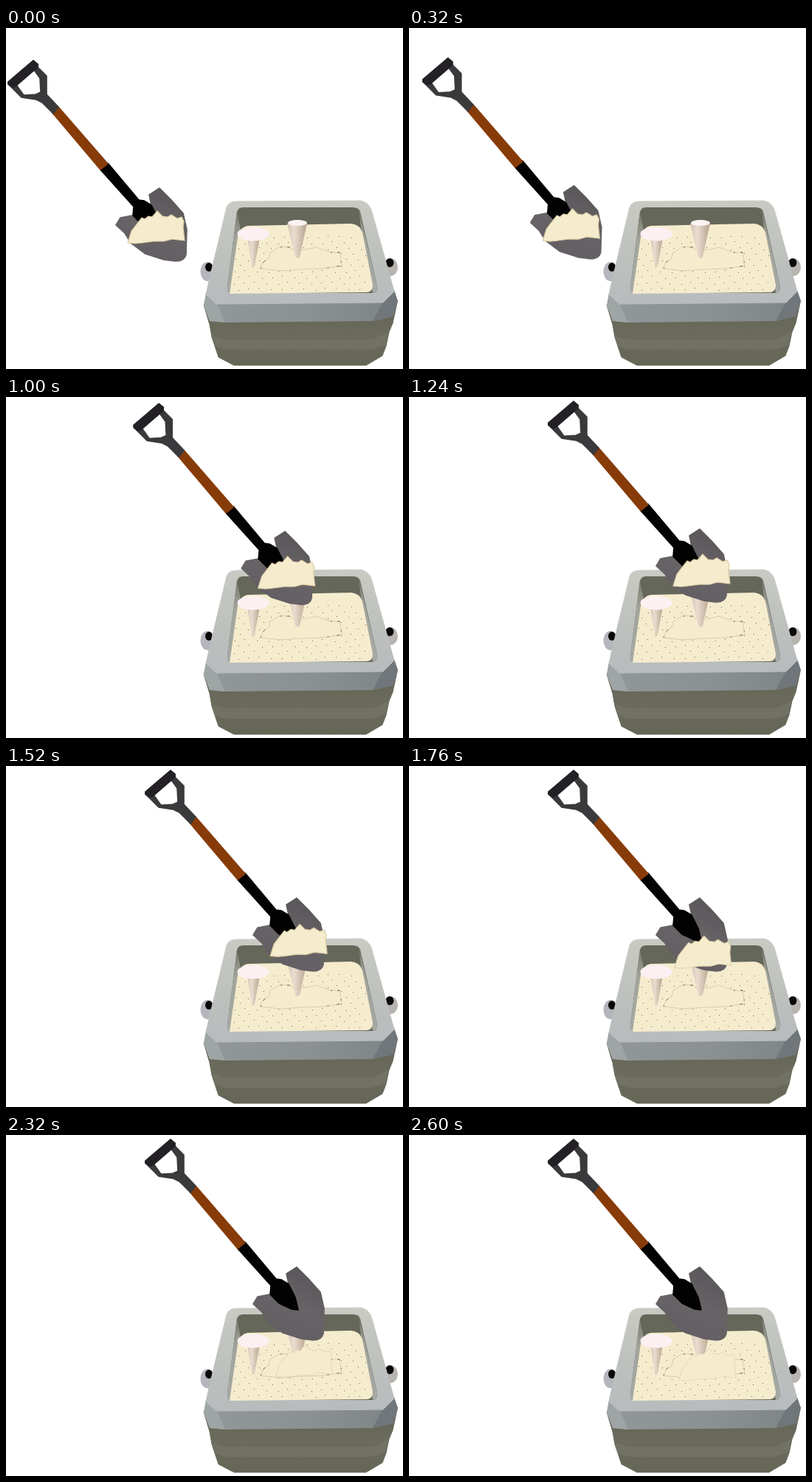
Recreate the animation shown at these times as an HTML page. Size 538 by 462 pixels, loop 2640 ms.

```html
<!DOCTYPE html>
<html lang="en">
<head>
<meta charset="utf-8">
<title>Filling the mould</title>
<style>
html, body { margin: 0; width: 100%; height: 100%; overflow: hidden; background: #fff; }
svg { display: block; width: 538px; height: 462px; }
</style>
</head>
<body>
<svg viewBox="0 0 538 462">
  <defs>
    <linearGradient id="cone">
      <stop offset="0" stop-color="#d3c4b6"/><stop offset=".35" stop-color="#eadccf"/><stop offset="1" stop-color="#b5a28d"/>
    </linearGradient>
    <linearGradient id="steel" x1="1" y1="0" x2=".5" y2="1">
      <stop offset="0" stop-color="#565356"/><stop offset=".6" stop-color="#676366"/><stop offset="1" stop-color="#625e63"/>
    </linearGradient>
    <linearGradient id="rim" x2="0" y2="1">
      <stop offset="0" stop-color="#c8cac3"/><stop offset=".5" stop-color="#bec1bd"/><stop offset="1" stop-color="#b7bbbd"/>
    </linearGradient>
    <linearGradient id="band">
      <stop offset="0" stop-color="#92989a"/><stop offset=".55" stop-color="#8b9091"/><stop offset="1" stop-color="#7e8485"/>
    </linearGradient>
    <linearGradient id="base" x2="0" y2="1">
      <stop offset="0" stop-color="#636454"/><stop offset=".5" stop-color="#6a6b5c"/><stop offset="1" stop-color="#656656"/>
    </linearGradient>
    <linearGradient id="wall" x2="0" y2="1">
      <stop offset="0" stop-color="#77786b"/><stop offset=".35" stop-color="#a2a59c"/><stop offset="1" stop-color="#a6a9a4"/>
    </linearGradient>
  </defs>

  <g id="box">
    <ellipse cx="273" cy="330" rx="9.500" ry="13" fill="#b4b5bd"/>
    <ellipse cx="275" cy="324" rx="5" ry="6" fill="#080808"/>
    <ellipse cx="521" cy="324" rx="10" ry="12" fill="#b8b5b0"/>
    <ellipse cx="520" cy="318" rx="5.500" ry="6" fill="#080808"/>
    <path fill="url(#base)" stroke="url(#base)" d="M268 375 276 402 279 419 283 431 288 446 309 457H488L510 444 515 431 519 412 524 400 530 372Z"/>
    <path fill="#717264" d="M279 417 297 422H497L518 412 514 430 495 436H298L283 431Z"/>
    <path fill="url(#band)" d="M271 360 268 376 276 397 297 399 497 397 524 391 531 370 526 355Z"/>
    <path fill="#9fa4a4" d="M271 360 268 376 276 397 297 399 285 372Z"/>
    <path fill="#70767a" d="M511 371 497 397 524 391 531 370 526 356Z"/>
    <path fill="url(#rim)" stroke="url(#rim)" d="M299 243Q302 235 312 235L481 234Q491 236 495 246L526 357 511 372 285 374 271 361 275 343Z"/>
    <path fill="#65675a" d="M313 249Q315 243 321 243H470Q478 243 480 249L503 349Q504 358 497 359H304Q299 358 300 350Z"/>
    <path fill="url(#wall)" d="M478 245 503 349Q504 358 497 359L481 272Z"/>
    <path fill="url(#wall)" d="M313 249 300 350Q299 358 304 359L318 274Z"/>
    <path fill="#f5ecce" d="M314 283Q318 269 328 268L468 265Q479 266 483 277L497 348Q497 357 490 358L303 360Z"/>
    <g id="grains" fill="#6c6450"/>
    <path fill="#f5ecce" stroke="#dccda5" d="M345 326 348 318 356 312 358 304 372 296 384 297 390 301 408 300 420 297 440 304 452 304 455 322 430 326 400 327 372 329Z"/>
    <path fill="none" stroke="#78674c" stroke-dasharray="2 7 4 11" d="M345 326 348 318 356 311M440 304 452 304 455 322 430 326M372 297 386 297"/>
    <path fill="url(#cone)" d="M327 284H344L337 322Q335 325 333 322Z"/>
    <ellipse cx="335" cy="279" rx="21.500" ry="9.500" fill="#fcf0f2"/>
    <path fill="url(#cone)" d="M381 265H408L398 310Q395 313 392 310Z"/>
    <ellipse cx="395" cy="264" rx="13" ry="4" fill="#fbf3f2"/>
  </g>

  <g id="shovel" stroke-width="1.600" stroke-linejoin="round">
    <path fill="url(#steel)" stroke="url(#steel)" d="M149 267 155 257 171 254 197 240 194 226 208 217 224 233 240 251 245 273 244 307Q242 316 230 316L214 314 189 306 169 291 161 278Z"/>
    <path fill="#020202" stroke="#020202" d="M138 183 180 233 187 234 197 240 206 258 210 275 201 274 184 266 172 254 173 242 128 192Z"/>
    <path fill="#873b08" stroke="#873b08" d="M71 107 138 184 128 192 63 115Z"/>
    <path fill="#3a393b" stroke="#3a393b" fill-rule="evenodd" d="M3 73 37 44 43 49V53L55 65V90L71 107 64 116 49 101 41 97 21 94 3 76ZM14 77 24 91 40 90 47 87 46 68 38 57Z"/>
    <path fill="#242126" stroke="#242126" d="M3 73 37 44 43 49V53L13 79 9 80 3 76Z"/>
  </g>

  <path id="scoop" fill="#f5ecce" stroke="#dccda5" stroke-width="1.200" stroke-linejoin="round" d="M165 291 170 275 180 262 184 257 188 259 193 255 198 256 205 248 212 255 219 256 224 253 232 258 238 256 241 262 240 270 242 288 225 286 214 289 200 289 185 291 175 292Z"/>
</svg>
<script>
const LOOP = 2640;
const byId = id => document.getElementById(id);
const shovel = byId("shovel"), scoop = byId("scoop");

// Staggered grains that follow the tapered bed
let grains = "";
for (let row = 0; row < 10; row++) {
  const y = 283 + row * 7.8;
  const left = 317 - row * 1.2, right = 482 + row * 1.2;
  for (let x = left + (row % 2) * 7; x < right; x += 15) {
    const jitter = Math.sin(x * 7 + row * 3) * 1.5;
    grains += `<rect x="${Math.round(x + jitter)}" y="${Math.round(y + jitter)}" width="1" height="1"/>`;
  }
}
byId("grains").innerHTML = grains;

function ease(time, start, end) {
  const p = Math.min(1, Math.max(0, (time - start) / (end - start)));
  return p * p * (3 - 2 * p);
}

function draw(now) {
  const time = now % LOOP;
  const carry = ease(time, 131, 1191);
  const drop = ease(time, 1440, 2480);
  shovel.setAttribute("transform", `translate(${186 * carry} ${-38 * carry})`);
  scoop.setAttribute("transform", `translate(${193 * carry + 8 * drop} ${-35 * carry + 76 * drop})`);
  scoop.setAttribute("stroke-opacity", 1 - 0.5 * drop);
  requestAnimationFrame(draw);
}
draw(performance.now());
</script>
</body>
</html>
```
